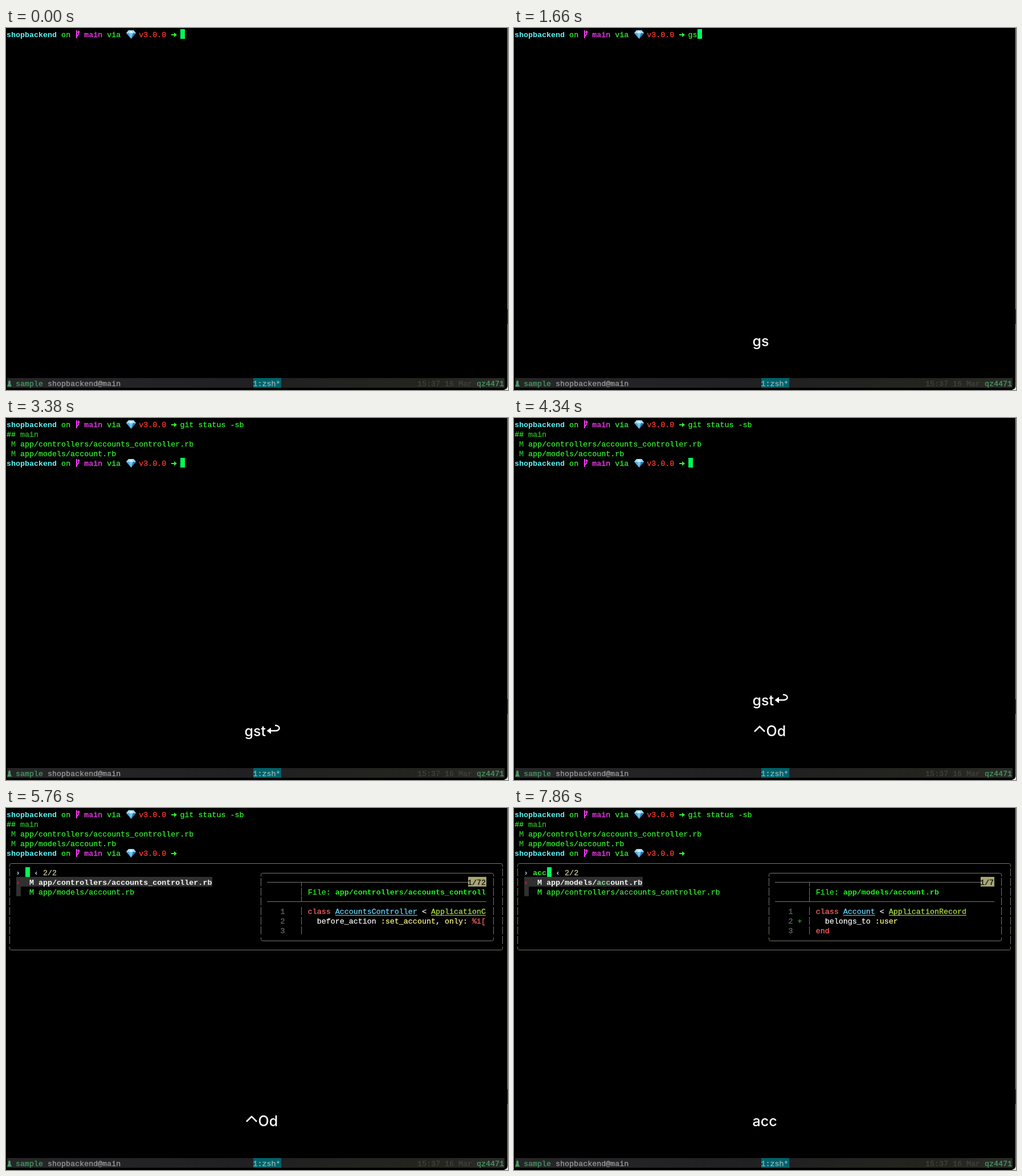
An HTML page with a canvas for the animation above (8000 ms loop, 881 by 636 pixels).

```html
<!DOCTYPE html>
<html>
<head>
<meta charset="utf-8">
<style>
  html, body { margin: 0; width: 100%; height: 100%; overflow: hidden; background: #000; }
  canvas { display: block; }
</style>
</head>
<body>
<canvas id="stage" width="881" height="636"></canvas>
<script>
const g = document.getElementById('stage').getContext('2d');
const LOOP = 8000, CELL = 8.01, ROW = 17;
const GREEN = '#33ee2e', DIM = '#2bb827', CYAN = '#5cf5f5', PINK = '#f93cf9', RED = '#ff3b2f',
      CURSOR = '#00fb57', BORDER = '#77776f', WHITE = '#f4f4f4', YELLOW = '#f6f287',
      CORAL = '#ff6464', SKY = '#66d3f7', LIME = '#abdc45', BRIGHT = '#1cf51c';
const PROJECT = 'shopbackend', SESSION = 'sample', HOST = 'qz4471';
const CONTROLLER = 'app/controllers/accounts_controller.rb', MODEL = 'app/models/account.rb';

const colX = col => 1 + CELL * col;
const rowY = row => 2 + ROW * row;

function rect(x, y, w, h, color) {
  g.fillStyle = color;
  g.fillRect(x, y, w, h);
}

// The thin outline gives the text its slightly heavy weight.
function put(col, row, text, color, bold, underline) {
  const x = colX(col), y = rowY(row) + 14;
  g.font = `${bold ? 'bold ' : ''}13.35px "Liberation Mono", monospace`;
  g.fillStyle = g.strokeStyle = color;
  g.lineWidth = .3;
  g.fillText(text, x, y);
  if (!bold) g.strokeText(text, x, y);
  if (underline) rect(x, y + 2, text.length * CELL, 1, color);
}

function path(points, color, width) {
  g.beginPath();
  points.forEach(([x, y]) => g.lineTo(x, y));
  if (width) {
    g.strokeStyle = color;
    g.lineWidth = width;
    g.stroke();
  } else {
    g.fillStyle = color;
    g.fill();
  }
}

function cursor(col, row) {
  rect(Math.round(colX(col)) + 1, rowY(row), 8, ROW, CURSOR);
}

function gem(x, y) {
  const at = (pts, color) => path(pts.map(([a, b]) => [x + a, y + b]), color);
  at([[4, 0], [13, 0], [17, 5], [8.5, 15], [0, 5]], '#4ba6dc');
  at([[4, 0], [13, 0], [17, 5], [0, 5]], '#9bdcf6');
  at([[5, 5], [8.5, 0], [12, 5]], '#d9f4ff');
  at([[5, 5], [12, 5], [8.5, 15]], '#78c6ee');
  at([[12, 5], [17, 5], [8.5, 15]], '#2b78b8');
}

function prompt(row) {
  const y = rowY(row);
  put(0, row, PROJECT, CYAN, true);
  put(12, row, 'on', GREEN);
  path([[124, y + 2], [124, y + 16]], PINK, 2);
  path([[127.5, y + 5], [127.5, y + 9], [124, y + 13]], PINK, 1.8);
  path([[125, y + 6], [127.5, y + 2], [130, y + 6]], PINK);
  put(17, row, 'main', PINK);
  put(22, row, 'via', GREEN);
  gem(211, y + 2);
  put(29, row, 'v3.0.0', RED);
  path([[290, y + 10], [297, y + 10]], GREEN, 2);
  path([[295, y + 6], [300, y + 10], [295, y + 14]], GREEN);
}

function box(left, top, right, bottom, firstRow, lastRow) {
  g.strokeStyle = BORDER;
  g.lineWidth = 1;
  for (const [y, dir] of [[top, 1], [bottom, -1]]) {
    g.beginPath();
    g.moveTo(left, y + 6 * dir);
    g.arcTo(left, y, left + 4, y, 3);
    g.arcTo(right, y, right, y + 6 * dir, 3);
    g.lineTo(right, y + 6 * dir);
    g.stroke();
  }
  for (let r = firstRow; r <= lastRow; r++)
    for (const x of [left, right]) bar(x, r);
}

function bar(x, row) {
  rect(x - .5, rowY(row) + 2, 1, 14, BORDER);
}

function fileRow(row, file, typed, selected) {
  const color = selected ? WHITE : GREEN;
  const at = file.indexOf('account');
  if (selected) rect(18, rowY(row), 344 - (38 - file.length) * CELL, ROW, '#303030');
  else rect(18, rowY(row), 8, ROW, '#303030');
  if (selected) put(2, row, '›', '#e0104c', true);
  put(5, row, 'M', color, selected);
  put(7, row, file.slice(0, at), color, selected);
  put(7 + at, row, file.slice(at, at + typed), selected ? '#8fd39b' : '#6fc070', selected);
  put(7 + at + typed, row, file.slice(at + typed), color, selected);
}

function preview(model) {
  const count = model ? '1/7' : '1/72';
  for (const row of [7, 9]) rect(458, rowY(row) + 9, 385, 1, BORDER);
  for (const row of [8, 10, 11, 12]) bar(518.5, row);
  rect(518, rowY(7) + 9, 1, 8, BORDER);
  rect(518, rowY(9), 1, 10, BORDER);
  rect(843 - count.length * 8, rowY(7), count.length * 8, ROW, '#a9a772');
  put(105 - count.length, 7, count, '#111');
  put(66, 8, 'File:', BRIGHT);
  put(72, 8, model ? MODEL : CONTROLLER.slice(0, 33), BRIGHT, true);
  for (let i = 1; i < 4; i++) put(60, 9 + i, String(i), '#686868');
  put(66, 10, 'class', CORAL);
  if (model) {
    put(72, 10, 'Account', SKY, false, true);
    put(80, 10, '<', WHITE);
    put(82, 10, 'ApplicationRecord', LIME, false, true);
    put(62, 11, '+', DIM);
    put(68, 11, 'belongs_to', WHITE);
    put(79, 11, ':user', YELLOW);
    put(66, 12, 'end', CORAL);
  } else {
    put(72, 10, 'AccountsController', SKY, false, true);
    put(91, 10, '<', WHITE);
    put(93, 10, 'ApplicationC', LIME, false, true);
    put(68, 11, 'before_action', WHITE);
    put(82, 11, ':set_account', YELLOW);
    put(94, 11, ',', WHITE);
    put(96, 11, 'only:', YELLOW);
    put(102, 11, '%i[', CORAL);
  }
}

const searchLength = t => t < 6860 ? 0 : t < 7120 ? 1 : t < 7300 ? 2 : 3;
const aliasLength = t => t < 1420 ? 0 : t < 1580 ? 1 : t < 1760 ? 2 : 3;

function finder(t) {
  const typed = searchLength(t);
  box(6.5, 97.5, 871.5, 249.5, 6, 13);
  box(447.5, 114.5, 855.5, 233.5, 7, 12);
  put(2, 6, '›', '#a9d4ff', true);
  put(4, 6, 'acc'.slice(0, typed), GREEN, true);
  cursor(4 + typed, 6);
  put(6 + typed, 6, '‹', '#a9d4ff', true);
  put(8 + typed, 6, '2/2', '#cccb9a');
  const files = typed ? [MODEL, CONTROLLER] : [CONTROLLER, MODEL];
  files.forEach((file, i) => fileRow(7 + i, file, typed, i === 0));
  if (t >= 4460) preview(t >= 7200);
}

function keyText(text, x, y) {
  g.font = '500 25px Inter, sans-serif';
  g.fillStyle = '#fff';
  g.fillText(text, x, y);
}

function returnKey(y) {
  g.beginPath();
  g.moveTo(472, y - 19);
  g.bezierCurveTo(482, y - 19, 482, y - 9.5, 473, y - 9.5);
  g.lineTo(463, y - 9.5);
  g.strokeStyle = '#fff';
  g.lineWidth = 2.4;
  g.stroke();
  path([[457.5, y - 9.5], [465, y - 15], [465, y - 4]], '#fff');
}

function keys(t) {
  const low = 559, high = 505;
  const fade = (start, end) => Math.max(0, Math.min(1, (end - t) / (end - start)));
  if (t >= 1420) {
    const y = t < 3780 ? low : high;
    g.globalAlpha = fade(4780, 5200);
    keyText('gst'.slice(0, aliasLength(t)), 418.5, y);
    if (t >= 2080) returnKey(y);
  }
  if (t >= 3780) {
    const y = t < 6860 ? low : high;
    g.globalAlpha = fade(7020, 7440);
    path([[422, y - 8], [431, y - 17], [440, y - 8]], '#fff', 2.6);
    keyText(t < 4180 ? 'O' : 'Od', 442.5, y);
  }
  g.globalAlpha = 1;
  keyText('acc'.slice(0, searchLength(t)), 418.5, low);
}

function statusBar() {
  const shade = g.createLinearGradient(2, 0, 875, 0);
  shade.addColorStop(0, '#262628');
  shade.addColorStop(.5, '#202022');
  shade.addColorStop(.85, '#24241e');
  shade.addColorStop(1, '#2b2b29');
  rect(2, 615, 873, 17, shade);
  path([[2, 630], [4, 625], [4, 621], [6, 619], [8, 621], [8, 625], [10, 630]], '#459a62');
  const row = 36.06;
  put(2, row, SESSION, '#459a62');
  put(9, row, PROJECT + '@main', '#9a9a9c');
  rect(434, 615, 49, 17, '#00626b');
  put(54, row, '1:zsh*', '#96b4b3');
  put(90, row, '15:37 16 Mar', '#41413f');
  put(103, row, HOST, '#459a62');
}

function windowEdge() {
  rect(880, 0, 1, 636, '#a8a8a8');
  rect(880, 494, 1, 26, '#b02222');
  path([[881, 629], [881, 636], [874, 636], [878.5, 633.5]], '#e4e4e4');
}

function draw(t) {
  rect(0, 0, 881, 636, '#000');
  prompt(0);
  if (t < 2080) {
    const typed = aliasLength(t);
    put(38, 0, 'gst'.slice(0, typed), GREEN);
    cursor(38 + typed, 0);
  } else {
    put(38, 0, 'git status -sb', GREEN);
    put(0, 1, '##', GREEN, true);
    put(3, 1, 'main', DIM);
    [CONTROLLER, MODEL].forEach((file, i) => {
      put(1, 2 + i, 'M', DIM);
      put(3, 2 + i, file, GREEN);
    });
    prompt(4);
    if (t < 4380) cursor(38, 4);
    else finder(t);
  }
  keys(t);
  statusBar();
  windowEdge();
}

function tick() {
  draw(performance.now() % LOOP);
  requestAnimationFrame(tick);
}
tick();
</script>
</body>
</html>
```
